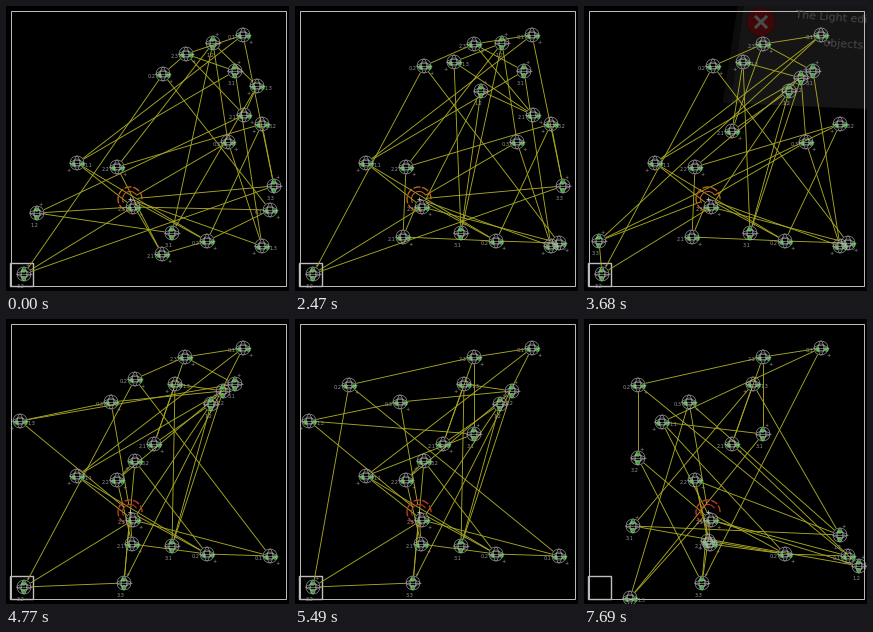
Recreate the animation shown at these times as a matplotlib script. Size 283 by 285 pixels, loop 7.81 s.

```python
import numpy as np
import matplotlib.pyplot as plt
from matplotlib.animation import FuncAnimation
from matplotlib.collections import LineCollection
from matplotlib.patches import Arc, Circle, Polygon, Rectangle

W, H, LOOP, STEP = 283, 285, 7810, 22
PX = 0.72  # points per pixel at 100 dpi
RADIUS = 7.5
LAMP = (124, 193)

START = dict(
    A=(237, 29), B=(207, 37), C=(180, 48), D=(229, 65), E=(157, 68),
    F=(251, 80), G=(238, 109), H=(256, 118), I=(222, 136), J=(71, 157),
    K=(111, 161), L=(268, 180), M=(264, 204), N=(31, 207), O=(127, 201),
    P=(166, 227), Q=(201, 235), R=(256, 240), S=(156, 248), T=(18, 268))

# time in ms, node, new place
MOVES = [
    (1500, "N", 186, 85), (1620, "M", 264, 237), (1870, "E", 129, 60),
    (1990, "C", 179, 38), (2230, "S", 108, 231), (2470, "F", 159, 56),
    (2590, "L", 15, 235), (2830, "N", 205, 85), (3080, "B", 217, 72),
    (3200, "G", 148, 125), (3800, "H", 129, 142), (4040, "L", 118, 264),
    (4160, "S", 126, 225), (4400, "I", 105, 83), (4520, "F", 169, 65),
    (4770, "R", 14, 102), (5010, "E", 54, 66), (5490, "D", 179, 115),
    (5730, "N", 275, 247), (5980, "T", 54, 139), (6100, "B", 256, 216),
    (6340, "J", 78, 103), (6710, "H", 42, 70), (6950, "H", 124, 222),
    (7320, "R", 40, 262), (7440, "P", 49, 207), (7690, "R", 46, 279)]

# "*" is the lamp
EDGES = ("TE TO TL L* LA LH AC AJ CE CD CG EM DR DJ RI R* I* IB NO NP NG "
         "BP BK BF FP FG SK S* SQ HQ HK JQ JO MQ MO Q*").split()
SIDEWAYS = set("BLNPTD")
DIALOG_TIMES = [(3680, 3800), (5250, 5370)]


def gray(v):
    return (v / 255,) * 3


def ellipse(rx, ry):
    a = np.linspace(0, 2 * np.pi, 25)
    return np.column_stack([rx * np.cos(a), ry * np.sin(a)])


GLYPH = [ellipse(7, 7), ellipse(4, 4), ellipse(7, 2.5), ellipse(2.5, 7),
         np.array([(-8, 0), (8, 0)])]

fig = plt.figure(figsize=((W + 0.01) / 100, (H + 0.01) / 100), dpi=100,
                 facecolor="black")
ax = fig.add_axes([0, 0, 1, 1])
ax.set_xlim(0, W)
ax.set_ylim(H, 0)
ax.axis("off")

# dim tilted message window
dialog = [
    ax.add_patch(Polygon([(154, -1), (284, -1), (284, 103), (139, 97)],
                         fc=gray(21), ec="none")),
    ax.add_patch(Polygon([(154, -1), (160, -1), (147, 97), (139, 97)],
                         fc=gray(12), ec="none")),
    ax.add_patch(Circle((177, 16), 14, fc=(0.24, 0.03, 0.03),
                        ec=(0.16, 0.03, 0.03), lw=PX)),
    *ax.plot([172, 182], [11, 21], color=gray(75), lw=3 * PX),
    *ax.plot([182, 172], [11, 21], color=gray(75), lw=3 * PX)]
for x, y, words in [(211, 9, "The Light edi"), (239, 37, "objects (")]:
    dialog.append(ax.text(x, y, words, color=gray(72), size=11 * PX,
                          family="DejaVu Sans", rotation=-4, va="center",
                          rotation_mode="anchor", clip_on=True))

ax.add_patch(Rectangle((4.5, 5.5), 275, 275, fill=False, ec=gray(185), lw=PX))
ax.add_patch(Rectangle((4, 257), 23, 23, fill=False, ec=gray(190),
                       lw=1.4 * PX))

wires = ax.add_collection(LineCollection([], colors=[(0.66, 0.66, 0.13)],
                                         linewidths=0.9 * PX, zorder=2))
lamp_parts = [
    ax.add_patch(Arc(LAMP, 24, 24, theta1=a, theta2=a + 34, lw=1.3 * PX,
                     zorder=3))
    for a in range(75, 350, 42)]
lamp_parts += [ax.add_patch(Arc(LAMP, 15, 15, theta1=150, theta2=330,
                                lw=PX, zorder=3))]
ax.plot(*LAMP, "+", color=gray(190), ms=5 * PX, mew=0.8 * PX, zorder=4)

green = ax.scatter([], [], s=(4.8 * PX) ** 2, color=[(0.16, 0.62, 0.12)],
                   marker="o", lw=0, zorder=4)
rings = ax.add_collection(LineCollection([], colors=[gray(180)], alpha=0.85,
                                         linewidths=0.65 * PX, zorder=5))
labels, marks = {}, {}
for i, name in enumerate(START):
    style = dict(color=gray(150), size=5 * PX, family="DejaVu Sans",
                 ha="center", va="center", zorder=5)
    labels[name] = ax.text(0, 0, f"{i % 4},{1 + i % 3}", **style)
    marks[name] = ax.text(0, 0, "+", **style)


def places(t):
    now = dict(START)
    for when, name, x, y in MOVES:
        if t >= when:
            now[name] = (x, y)
    now["*"] = LAMP
    return {k: np.array(p, float) for k, p in now.items()}


def wire(p, q):
    """Segment between two nodes, cut at their outer rings."""
    d = q - p
    cut = d / max(np.hypot(*d), 1) * min(RADIUS, np.hypot(*d) / 2)
    return [p + cut, q - cut]


def draw(n):
    t = (n + 1) * STEP - 1
    pos = places(t)
    wires.set_segments([wire(pos[a], pos[b]) for a, b in EDGES])

    outlines, dots = [], []
    for i, name in enumerate(START):
        p = pos[name]
        outlines += [p + g for g in GLYPH]
        pair = [(-1, -4), (-1, 4)] if name in SIDEWAYS else [(-4.5, 1),
                                                             (4.5, 1)]
        dots += [p + d for d in pair]
        side = 1 if i % 2 else -1
        if name in SIDEWAYS:
            labels[name].set_position(p + (-3, 12 * side))
            marks[name].set_position(p + (4, -9 * side))
        else:
            labels[name].set_position(p + (11 * side, 2))
            marks[name].set_position(p + (-8 * side, 7))
    rings.set_segments(outlines)
    green.set_offsets(dots)

    color = (0.8, 0.4, 0.12) if t < 4400 else (0.78, 0.24, 0.16)
    for part in lamp_parts:
        part.set_edgecolor(color)
    shown = any(a <= t < b for a, b in DIALOG_TIMES)
    for part in dialog:
        part.set_visible(shown)
    return []


anim = FuncAnimation(fig, draw, frames=LOOP // STEP, interval=STEP,
                     init_func=lambda: draw(0), repeat=True, repeat_delay=0,
                     blit=False)
plt.show()
```
